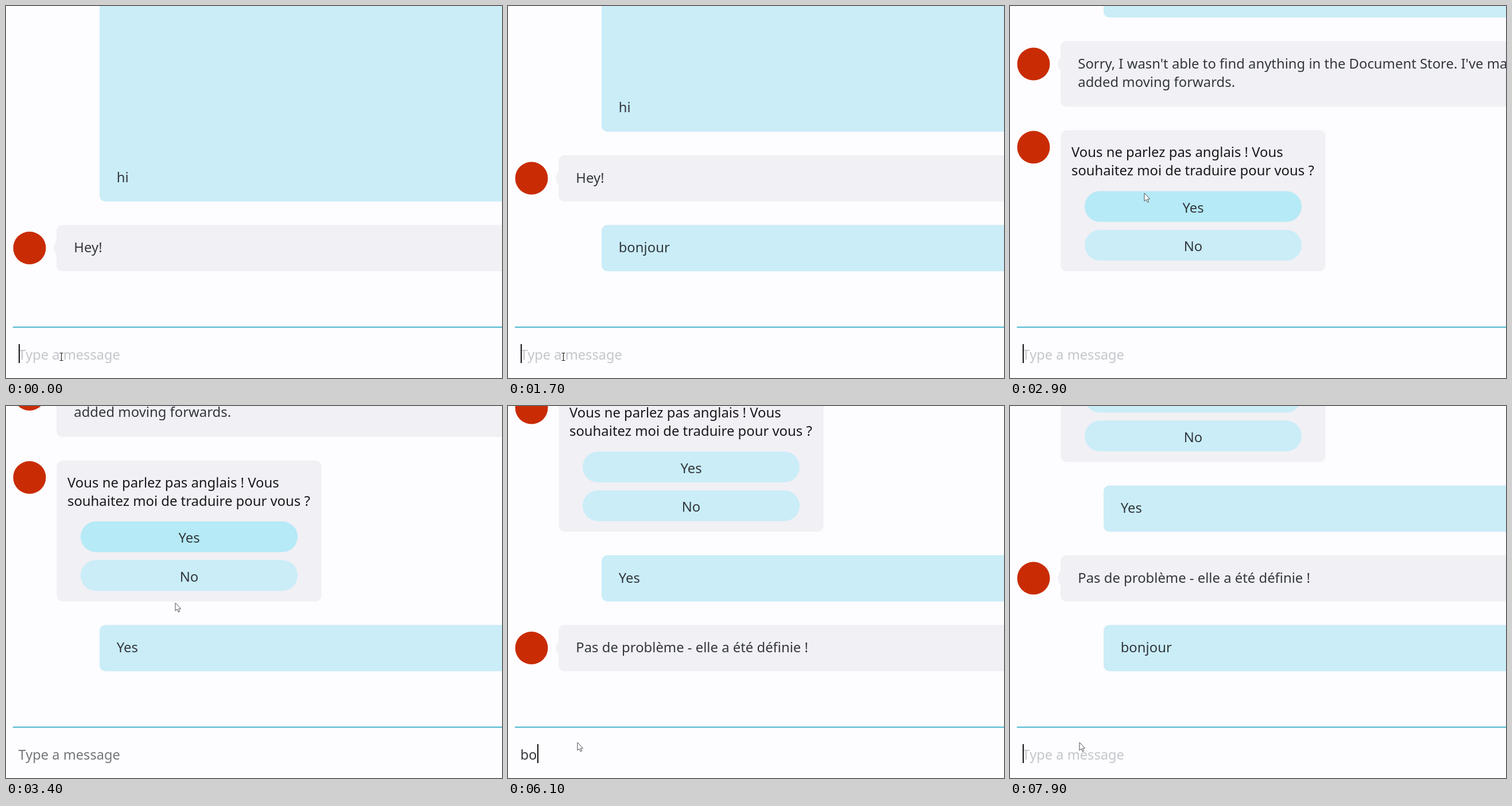
An HTML page with a canvas that plays this animation: 864x648 px, repeating every 8000 ms.

```html
<!DOCTYPE html>
<html lang="en">
<head>
<meta charset="utf-8">
<title>Chat translation</title>
<style>
html, body { margin: 0; width: 100%; height: 100%; overflow: hidden; background: #fdfcfe; }
canvas { display: block; width: 864px; height: 648px; }
</style>
</head>
<body>
<canvas id="stage" width="864" height="648"></canvas>
<script>
const ctx = document.getElementById('stage').getContext('2d');
const W = 864, H = 648, LOOP = 8000, STEP = 100;
const FAMILY = '"Noto Sans", "Open Sans", sans-serif';
const CHAT_FONT = '23.87px ' + FAMILY, INPUT_FONT = '23.65px ' + FAMILY;
const BG = '#fdfcfe', BLUE = '#caedf8', HOVER = '#b5eaf6', GREY = '#f1f0f5';
const RED = '#c92c04', LINE = '#42b6cd', INK = '#32373c';
const GAP = 41, FLOOR = 462, PLAIN_H = 80.5, INPUT_X = 21.5;
const HOVER_ON = 2900, CLICK = 3200, HOVER_OFF = 5000, FOCUS = 5200;

const messages = [
  { at: 0, kind: 'user', h: 400, lines: ['hi'], base: 366 },
  { at: 0, kind: 'bot', lines: ['Hey!'] },
  { at: 1700, kind: 'user', lines: ['bonjour'] },
  { at: 2700, kind: 'bot', h: 114.5, lines: [
    "Sorry, I wasn't able to find anything in the Document Store. I've made",
    'added moving forwards.'] },
  { at: 2800, kind: 'card', h: 245.5, lines: [
    'Vous ne parlez pas anglais ! Vous',
    'souhaitez moi de traduire pour vous ?'] },
  { at: CLICK, kind: 'user', lines: ['Yes'] },
  { at: 4200, kind: 'bot', lines: ['Pas de problème - elle a été définie !'] },
  { at: 7600, kind: 'user', lines: ['bonjour'] }
];

// [time, number of letters in the input]
const typing = [
  [0, 0], [100, 1], [400, 2], [700, 3], [900, 4], [1000, 5], [1100, 6], [1200, 7], [1700, 0],
  [5300, 1], [6100, 2], [6300, 3], [6900, 4], [7200, 5], [7400, 7], [7600, 0]
];

// [time, x, y] of the arrow tip
const path = [
  [2700, 142, 515], [2900, 234, 326], [3100, 295, 343],
  [4900, 295, 343], [5200, 121, 586]
];

function text(str, x, y, color = INK, align = 'left') {
  ctx.fillStyle = color;
  ctx.textAlign = align;
  ctx.fillText(str, x, y);
}

function box(x, y, w, h, r, color) {
  ctx.fillStyle = color;
  ctx.beginPath();
  ctx.roundRect(x, y, w, h, r);
  ctx.fill();
}

function avatar(y) {
  ctx.fillStyle = RED;
  ctx.beginPath();
  ctx.arc(41, y, 28.5, 0, Math.PI * 2);
  ctx.fill();
}

function lines(list, x, y, color) {
  list.forEach((s, i) => text(s, x, y + i * 32, color));
}

function tail(y) {
  ctx.fillStyle = GREY;
  ctx.beginPath();
  ctx.moveTo(89, y - 13);
  ctx.quadraticCurveTo(78, y, 89, y + 13);
  ctx.fill();
}

function button(label, y, color) {
  box(130, y, 378, 53.5, 26.75, color);
  text(label, 319, y + 37, INK, 'center');
}

const draw = {
  user(m, y) {
    box(163, y, W, m.h, 10, BLUE);
    lines(m.lines, 192.7, y + (m.base || 47.5));
  },
  bot(m, y) {
    avatar(y + 40);
    box(88, y, W, m.h, 10, GREY);
    tail(y + 40);
    lines(m.lines, 118.3, y + 47.5);
  },
  card(m, y, t) {
    avatar(y + 29.5);
    box(88.5, y, 461, m.h, 10, GREY);
    lines(m.lines, 107, y + 46.5, '#16181b');
    button('Yes', y + 106, t >= HOVER_ON && t < HOVER_OFF ? HOVER : BLUE);
    button('No', y + 173.5, BLUE);
  }
};

function drawChat(t) {
  ctx.font = CHAT_FONT;
  let bottom = FLOOR;
  for (let i = messages.length - 1; i >= 0 && bottom > 0; i--) {
    const m = messages[i];
    if (t < m.at) continue;
    draw[m.kind](m, bottom - m.h, t);
    bottom -= m.h + GAP;
  }
}

function drawInput(t) {
  const focused = t < CLICK || t >= FOCUS;
  const typed = 'bonjour'.slice(0, typing.findLast(k => t >= k[0])[1]);
  ctx.font = INPUT_FONT;
  ctx.fillStyle = LINE;
  ctx.fillRect(12, 558.5, W, 2);
  if (typed) text(typed, INPUT_X, 616);
  else text('Type a message', INPUT_X, 616, focused ? '#c3c7cc' : '#73777b');
  if (focused) {
    const x = INPUT_X + (typed ? ctx.measureText(typed).width + 1 : 0);
    ctx.fillStyle = '#111';
    ctx.fillRect(Math.round(x), 589, 2, 33);
  }
}

function ibeam(x, y) {
  ctx.strokeStyle = '#222';
  ctx.lineWidth = 1.2;
  ctx.beginPath();
  for (const s of [-1, 1]) {
    ctx.moveTo(x - 3, y + s * 6.5);
    ctx.lineTo(x + 3, y + s * 6.5);
  }
  ctx.moveTo(x, y - 6.5);
  ctx.lineTo(x, y + 6.5);
  ctx.stroke();
}

function arrow(x, y) {
  const shape = [[0, 0], [0, 14], [3, 11], [5.5, 16], [7.5, 15], [5.5, 10.5], [9.5, 10]];
  ctx.beginPath();
  shape.forEach(([dx, dy]) => ctx.lineTo(x + dx, y + dy));
  ctx.closePath();
  ctx.fillStyle = '#fff';
  ctx.fill();
  ctx.strokeStyle = '#4a4d55';
  ctx.lineWidth = 1;
  ctx.stroke();
}

function drawPointer(t) {
  if (t < path[0][0]) return ibeam(96.5, 611);
  const i = path.findLastIndex(p => t >= p[0]);
  const a = path[i], b = path[i + 1] || a;
  const k = a === b ? 0 : (t - a[0]) / (b[0] - a[0]);
  arrow(a[1] + (b[1] - a[1]) * k, a[2] + (b[2] - a[2]) * k);
}

function render(t) {
  ctx.fillStyle = BG;
  ctx.fillRect(0, 0, W, H);
  drawChat(t);
  drawInput(t);
  drawPointer(t);
}

messages.forEach(m => { m.h = m.h || PLAIN_H; });
const start = performance.now();

// The screen advances ten times a second.
function tick() {
  const t = (performance.now() - start) % LOOP;
  render(Math.floor(t / STEP) * STEP);
  requestAnimationFrame(tick);
}
tick();
</script>
</body>
</html>
```
